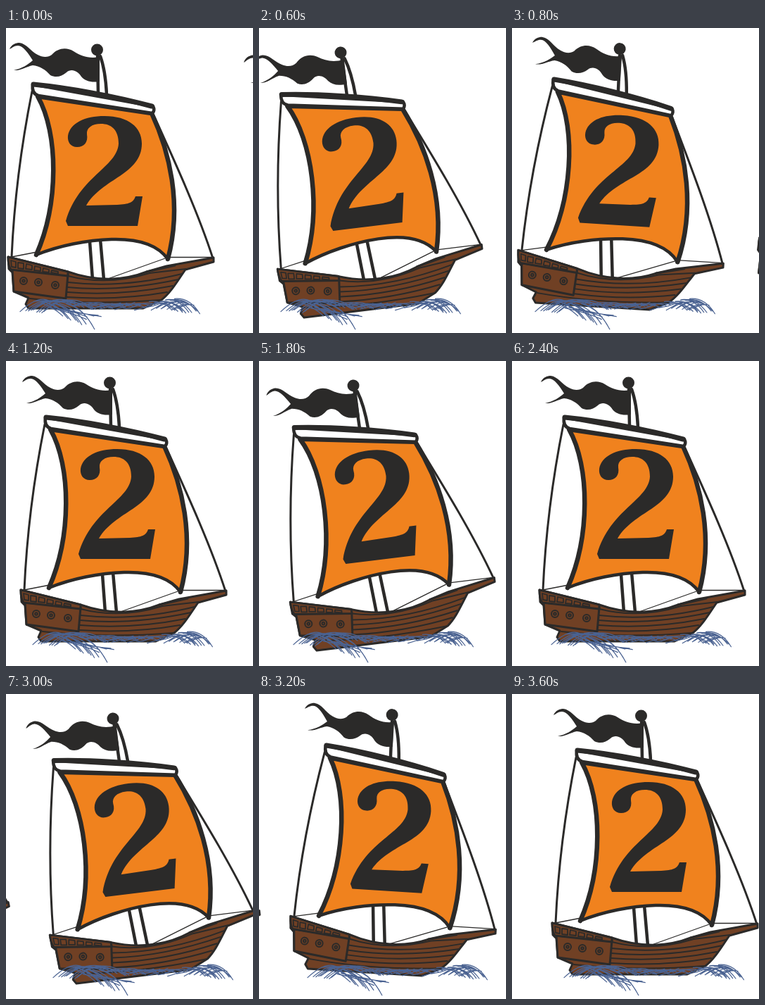
These frames come from a looping animation (351x433 px, 3800 ms). An HTML page:

```html
<!DOCTYPE html>
<html lang="en">
<head>
<meta charset="utf-8">
<title>Sailing ship</title>
<style>
  html, body { margin: 0; width: 100%; height: 100%; overflow: hidden; background: #fff; }
  svg { display: block; width: 351px; height: 433px; }
  .line { fill: none; stroke: #2b2a29; stroke-linecap: round; stroke-linejoin: round; }
  .ink { fill: #2b2a29; }
  .wood { fill: #704024; stroke: #2b2a29; stroke-linejoin: round; }
</style>
</head>
<body>
<svg viewBox="0 0 351 433" role="img" aria-label="Sailing ship with the number 2">
  <defs>
    <g id="ship">
      <!-- masts and rigging -->
      <path class="line" stroke-width="4.500" d="M130 40L131 94M134 40C139 54 142 74 143 94M119 303L123 357M134 300L139 357"/>
      <path class="line" stroke-width="3" d="M37 90C24 155 12 235 8 325M210 124C240 190 273 262 294 327"/>
      <path class="line" stroke-width="1.300" d="M8 325L44 318M229 325.500L295 325.500M142 357L229 326"/>

      <!-- flag -->
      <path class="ink" d="M5 30C8 23 14 21 19 21C29 22 35 33 45 38C52 42 60 42 65 38C74 28 86 27 96 33C107 40 118 44 133 41V76C121 78 112 75 107 69C102 61 93 57 86 63C79 69 71 71 63 67C56 59 48 54 38 53C28 55 21 61 11 60C24 57 31 52 38 46C31 35 24 25 17 25C12 25 9 28 5 30Z"/>
      <circle class="ink" cx="129.500" cy="31" r="8.500"/>

      <!-- sail -->
      <path d="M45 97C75 150 75 250 43 322C75 309 115 301 150 300C185 299 215 307 230 328C251 250 232 175 207 121Z" fill="#f0821e"/>
      <path class="line" stroke-width="6.500" d="M230 328C251 250 232 175 207 121L45 97C75 150 75 250 43 322"/>
      <path class="line" stroke-width="4.500" d="M43 322C75 309 115 301 150 300C185 299 215 307 230 328"/>
      <path d="M38 80L209 111Q212 117 208 121L46 96Q36 93 38 80Z" fill="#fff" stroke="#2b2a29" stroke-width="4.500" stroke-linejoin="round"/>
      <path class="line" stroke-width="7" d="M39 80C90 85 155 97 207 111"/>
      <path class="ink" d="M88 281L85 274C104 210 158 198 160 164C160 144 149 136 135 136C122 136 114 142 115 151C117 162 111 169 101 169C92 169 87 162 88 153C91 135 112 125 140 125C174 125 193 141 193 164C193 208 137 213 114 252L158 251C175 250 181 248 184 239H194L187 281Z"/>

      <!-- hull -->
      <path class="wood" stroke-width="3" d="M3 325L88 346C130 361 170 358 200 346L228 338L295 326V332L255 343C243 360 234 376 221 386L195 398H32L28 392L32 383L11 374L9 347L4 342Z"/>
      <path class="line" stroke-width="2" d="M88 352C135 364 175 357 204 348L256 342M88 361Q165 370 250 349M87 368Q160 375 245 357M87 375Q160 381 237 366M86 382Q160 387 229 375M34 384Q120 394 220 386"/>
      <path class="line" stroke-width="3" d="M200 346L240 337"/>
      <path class="wood" stroke-width="3" d="M9 343L88 350L85 384L11 374Z"/>
      <path class="wood" stroke-width="3" d="M3 325L88 346V352L7 343Q3 338 3 325Z"/>
      <path class="line" stroke-width="1.800" d="M7 330L14 332V340L8 339ZM17 333L25 334V342L17 341ZM29 335L37 337V343L28 342ZM41 338L49 340V345L40 344ZM53 341L61 343V347L52 346ZM65 344L74 346V349L64 347Z"/>
      <g id="portholes" class="wood" stroke-width="2"></g>
    </g>
    <path id="waves" fill="none" stroke="#4a6291" stroke-width="1.200" stroke-linecap="round"/>
  </defs>
  <g id="fleet"></g>
</svg>
<script>
const STEP = 200, LOOP = 3800, SPACING = 355, DRIFT = 3;

// One rocking cycle: tilt in degrees, small shift of the ship, shift of the waves.
const poses = [
  { tilt: 0, x: 0, y: 0, wave: 0 },
  { tilt: -7, x: 0, y: -1, wave: 1 },
  { tilt: -11.5, x: 0, y: -1, wave: 2 },
  { tilt: -7, x: 0.5, y: -1, wave: 2 },
  { tilt: 3.5, x: 0, y: 0, wave: 1 },
  { tilt: 10.5, x: -2, y: 3, wave: 0 }
];

const $ = id => document.getElementById(id);

function add(parent, name, attributes) {
  const node = document.createElementNS('http://www.w3.org/2000/svg', name);
  for (const key in attributes) node.setAttribute(key, attributes[key]);
  return parent.appendChild(node);
}

for (const [cx, cy] of [[25, 359], [46, 361], [70, 365]]) {
  add($('portholes'), 'circle', { cx, cy, r: 5 });
  add($('portholes'), 'circle', { cx, cy, r: 1.8 });
}

let seed = 7;
const random = (low, high) => {
  seed = (seed * 16807) % 2147483647;
  return low + (high - low) * seed / 2147483647;
};

// A bundle of curved strands running from one area to another.
function strands(count, from, to, bend) {
  let path = '';
  for (let i = 0; i < count; i++) {
    const t = i / (count - 1);
    const x = from[0] + (from[2] - from[0]) * t + random(-3, 3);
    const y = from[1] + (from[3] - from[1]) * t + random(-2, 2);
    const endX = to[0] + (to[2] - to[0]) * t + random(-3, 3);
    const endY = to[1] + (to[3] - to[1]) * t + random(-2, 2);
    path += `M${x} ${y}Q${x + (endX - x) * 0.6} ${Math.min(y, endY) + bend} ${endX} ${endY}`;
  }
  return path;
}

$('waves').setAttribute('d',
  strands(9, [23, 401, 52, 403], [62, 388, 96, 390], -7) +
  strands(6, [40, 389, 80, 388], [92, 394, 125, 400], -5) +
  strands(9, [50, 390, 88, 392], [80, 410, 128, 426], 6) +
  strands(5, [60, 396, 85, 402], [112, 412, 136, 408], 6) +
  strands(16, [88, 392, 175, 396], [125, 398, 212, 394], -6) +
  strands(8, [120, 399, 205, 399], [150, 391, 230, 390], 5) +
  strands(11, [206, 390, 240, 386], [238, 402, 277, 404], -2) +
  strands(7, [212, 397, 245, 400], [242, 388, 268, 392], -3));

const fleet = [-1, 0, 1].map(place => ({
  place,
  ship: add($('fleet'), 'use', { href: '#ship' }),
  waves: add($('fleet'), 'use', { href: '#waves' })
}));

function draw(time) {
  const step = Math.floor((time % LOOP) / STEP);
  for (const { place, ship, waves } of fleet) {
    const pose = poses[(step + place + 6) % 6];
    const x = step * DRIFT + place * SPACING;
    ship.setAttribute('transform', `translate(${x + pose.x} ${pose.y}) rotate(${pose.tilt} 158 221)`);
    waves.setAttribute('transform', `translate(${x + pose.wave} 0)`);
  }
}

const start = performance.now();
function tick() {
  draw(performance.now() - start);
  requestAnimationFrame(tick);
}
tick();
</script>
</body>
</html>
```
